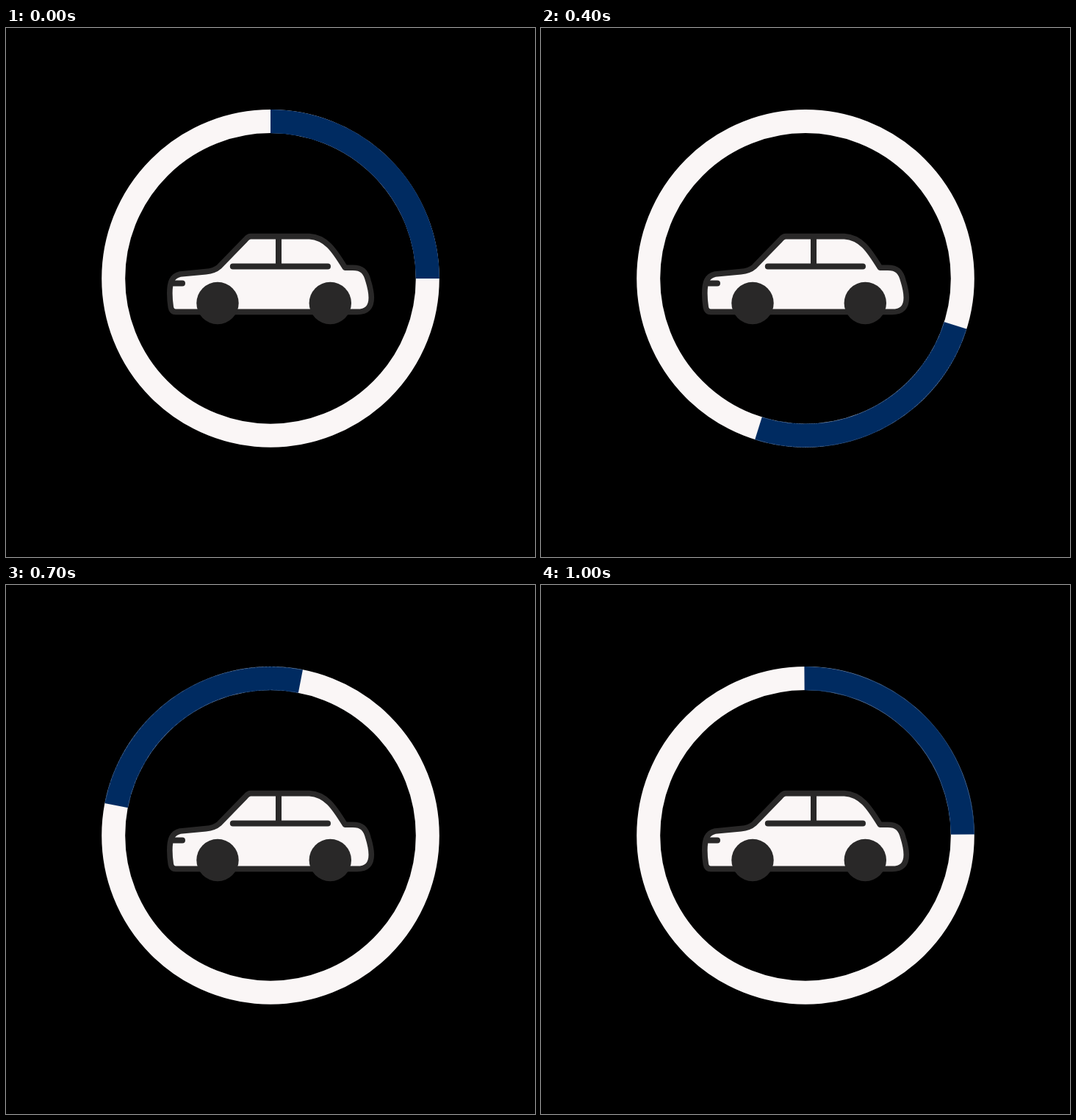
These frames come from a looping animation (720x720 px, 1.1 s). An HTML page without scripts:

```html
<!DOCTYPE html>
<html lang="en">
<head>
<meta charset="utf-8">
<title>Car loader</title>
<style>
  html, body { margin: 0; width: 100%; height: 100%; overflow: hidden; background: #000; }
  svg { display: block; width: 100vw; height: 100vh; }
  .ring { fill: none; stroke: #faf6f6; stroke-width: 32; }
  .arc {
    fill: none; stroke: #002b61; stroke-width: 32.2;
    transform-origin: 360px 340.9px;
    animation: turn 1100ms step-end infinite;
  }
  .car { stroke: #292828; stroke-width: 7.6; stroke-linecap: round; stroke-linejoin: round; }
  .body { fill: #faf6f6; }
  .trim { fill: none; stroke-width: 8; }
  .wheel { fill: #292828; stroke: none; }

  /* eased turn, one pose per 100 ms */
  @keyframes turn {
    0% { transform: rotate(0deg); }
    9.0909% { transform: rotate(5.3deg); }
    18.1818% { transform: rotate(23.3deg); }
    27.2727% { transform: rotate(57deg); }
    36.3636% { transform: rotate(107.4deg); }
    45.4545% { transform: rotate(170.7deg); }
    54.5454% { transform: rotate(235.1deg); }
    63.6363% { transform: rotate(281deg); }
    72.7272% { transform: rotate(314deg); }
    81.8181% { transform: rotate(345deg); }
    90.909%, 100% { transform: rotate(359.6deg); }
  }
</style>
</head>
<body>
<svg viewBox="0 0 720 720">
  <circle class="ring" cx="360" cy="340.9" r="213.8"/>
  <path class="arc" d="M360 127.1A213.8 213.8 0 0 1 573.8 340.9"/>
  <g class="car">
    <path class="body" d="M333 283.6H413C435 285 446 301 461.5 326.3H472
      C485 326.3 490 332 493 344Q497.3 358 497.3 367C497.3 380 491 386.4 478 386.4
      H231Q225.5 386.4 224.3 380Q222.8 370 222.8 361C222.8 346 226 337.5 237 335
      L272 331.6Q284 330.5 290 325L326 288Q329.5 283.6 333 283.6Z"/>
    <path class="trim" d="M308.8 324.5H438M371 284V324M226 347.5H240"/>
    <circle class="wheel" cx="288" cy="374.5" r="28.7"/>
    <circle class="wheel" cx="441.3" cy="374.5" r="28.7"/>
  </g>
</svg>
</body>
</html>
```
